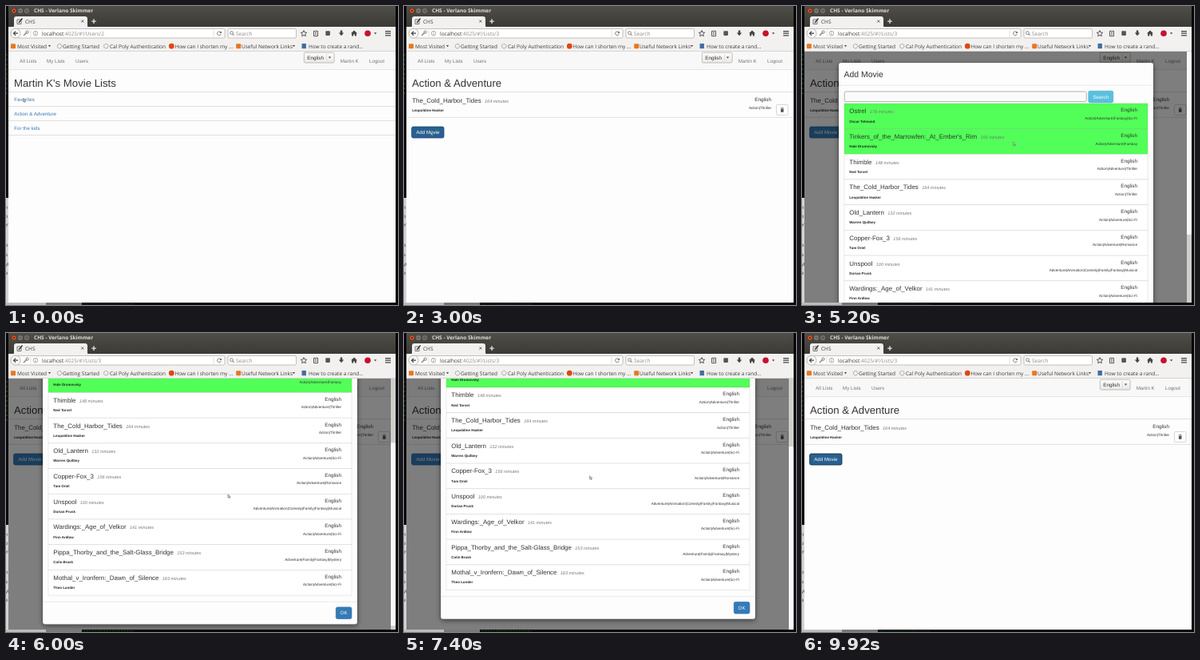
An HTML page that plays this animation: 491x374 px, repeating every 9.96 s.

```html
<!DOCTYPE html>
<html lang="en">
<head>
<meta charset="utf-8">
<title>Movie lists</title>
<style>
html, body { margin: 0; width: 100%; height: 100%; overflow: hidden; background: #000; }
svg { display: block; width: 491px; height: 374px; }
text { font-family: "Liberation Sans", Arial, sans-serif; white-space: pre; text-rendering: geometricPrecision; }
.ui { font-family: "Open Sans", "Noto Sans", sans-serif; }
.b { font-weight: bold; }
.i { font-style: italic; }
.end { text-anchor: end; }
.mid { text-anchor: middle; }
</style>
</head>
<body>
<svg id="stage" viewBox="0 0 491 374"></svg>
<script>
const LOOP = 9960;
const ROW = 31.7, LIST_TOP = 121.9, SCROLL = 117.3;

const movies = [
  ["Ostrel", 178, "Oscar Telmond", "Action|Adventure|Fantasy|Sci-Fi"],
  ["Tinkers_of_the_Marrowfen:_At_Ember's_Rim", 169, "Hale Drumovsky", "Action|Adventure|Fantasy"],
  ["Thimble", 148, "Ned Torvel", "Action|Adventure|Thriller"],
  ["The_Cold_Harbor_Tides", 164, "Leopoldine Hasker", "Action|Thriller"],
  ["Old_Lantern", 132, "Warren Quilbey", "Action|Adventure|Sci-Fi"],
  ["Copper-Fox_3", 156, "Tam Oriel", "Action|Adventure|Romance"],
  ["Unspool", 100, "Dorian Prusk", "Adventure|Animation|Comedy|Family|Fantasy|Musical"],
  ["Wardings:_Age_of_Velkor", 141, "Finn Ardlow", "Action|Adventure|Sci-Fi"],
  ["Pippa_Thorby_and_the_Salt-Glass_Bridge", 153, "Colin Brask", "Adventure|Family|Fantasy|Mystery"],
  ["Mothal_v_Ironfern:_Dawn_of_Silence", 183, "Theo Lunder", "Action|Adventure|Sci-Fi"]
];

// When a row gets picked: row index -> ms
const picks = { 0: 4400, 1: 4900, 5: 7500 };

// Pointer path: ms, x, y
const path = [
  [0, 21, 115], [300, 22, 115.5], [900, 43, 132], [1200, 43, 133], [1700, 42.5, 135.5],
  [1900, 38, 146], [2400, 33, 156], [3300, 33, 157], [4000, 315.5, 141.5], [4400, 315.5, 141.5],
  [4800, 264, 169.5], [5300, 264, 169.5], [6100, 278, 202.5], [6900, 278, 202.5],
  [7400, 232, 178], [7800, 232, 178], [8500, 211, 245], [8800, 211, 245],
  [9000, 265, 285], [9300, 422, 342], [9900, 422, 342]
];

const text = (x, y, s, size, fill, cls = "") =>
  `<text x="${x}" y="${y}" font-size="${size}" fill="${fill}" class="${cls}">${s.replace(/&/g, "&amp;")}</text>`;
const ui = (x, y, s, fill = "#3c3c3c", cls = "") => text(x, y, s, 6.5, fill, "ui " + cls);
const rect = (x, y, w, h, fill, extra = "") =>
  `<rect x="${x}" y="${y}" width="${w}" height="${h}" fill="${fill}" ${extra}/>`;
const dot = (x, y, r, fill, extra = "") => `<circle cx="${x}" cy="${y}" r="${r}" fill="${fill}" ${extra}/>`;
const line = (d, stroke = "#4a4a4a", w = 1) => `<path d="${d}" fill="none" stroke="${stroke}" stroke-width="${w}"/>`;
const shape = (d, fill = "#4a4a4a") => `<path d="${d}" fill="${fill}"/>`;
const caret = (x, y) => shape(`M${x - 1.6} ${y - 1}h3.2l-1.6 2.2z`);
const group = (id, body, extra = "") => `<g id="${id}" ${extra}>${body}</g>`;
const rule = y => rect(3, y, 485, 1, "#e0e0e0");

function desktop() {
  const scraps = [["n", 254], ["o", 265], ["Y", 276], ["p", 301], ["s", 313], ["yt", 325], ["e", 336]];
  let out = rect(0, 0, 491, 374, "#050505") + rect(0, 240, 3, 134, "#d4d4d4") +
    rect(0, 371, 50, 3, "#bdbdbd") + rect(50, 371, 45, 3, "#77787a");
  for (const [s, y] of scraps) out += text(-1, y, s, 6, "#444");
  return out + line("M97 372.5H160", "#164a16", '1" stroke-dasharray="2.4 1.2') +
    line("M1 60V110", "#164a16", '1.4" stroke-dasharray="2 4');
}

function titleBar() {
  return rect(3, 0, 485, 27, "url(#bar)") +
    dot(10, 6, 3.2, "#e2562b", 'stroke="#2b2a27" stroke-width=".6"') +
    line("M8.8 4.8l2.4 2.4m0-2.4l-2.4 2.4", "#3b1a0c", .8) +
    dot(18, 6, 3, "#7d7a72") + line("M16.6 6h2.8", "#35342f", .8) +
    dot(26, 6, 3, "#7d7a72") + line("M24.8 4.9h2.4v2.2h-2.4z", "#35342f", .6) +
    ui(35, 8.3, "CHS - Verlano Skimmer", "#e4e0d6", "b") +
    shape("M8 27q2 0 2-3v-8q0-3 3-3h86q3 0 3 3v8q0 3 2 3z", "#f2f1f0") +
    line("M14 17h5v5.5h-5z", "#6a6a6a", .9) + line("M16 21l4.5-5.5", "#333", 1.3) +
    ui(24, 21.6, "CHS") + line("M94.3 17.6l3 3m0-3l-3 3", "#555", .9) +
    line("M110 16.3v5.6M107.2 19.1h5.6", "#e8e6e0", 1.3);
}

function toolbar() {
  const field = (x, w) => rect(x, 28.5, w, 11.5, "#fff", 'rx="1.5" stroke="#b5b2ad" stroke-width=".8"');
  return rect(3, 26, 485, 31, "#f2f1f0") + field(14, 260) + field(278, 85.5) +
    dot(12, 34.2, 6, "#fafafa", 'stroke="#a9a6a1" stroke-width=".8"') +
    line("M15 34.2h-5.4m2.5-2.6l-2.6 2.6l2.6 2.6", "#444", 1.2) +
    line("M22 37l4-4", "#777", 1.1) + dot(26.6, 32.6, 1.6, "none", 'stroke="#777" stroke-width="1"') +
    line("M31 30v8.5", "#d0d0d0", .7) +
    dot(37, 34.2, 2.8, "none", 'stroke="#8a8a8a" stroke-width=".7"') + line("M37 33.6v2.3M37 32.2v.8", "#8a8a8a", .8) +
    `<text x="45" y="36.6" font-size="6.5" class="ui" fill="#8a8a8a"><tspan fill="#333">localhost</tspan>:4025/#!/<tspan id="route"></tspan></text>` +
    line("M260 30v8.5", "#d0d0d0", .7) + line("M269.2 33.2a2.4 2.4 0 1 0 .1 2", "#666", .9) + shape("M270 31.4v2.6h-2.6z", "#666") +
    dot(282.5, 33.6, 1.9, "none", 'stroke="#666" stroke-width=".8"') + line("M283.9 35l1.8 1.9", "#666", 1) +
    ui(288, 36.6, "Search", "#8a8a8a") +
    `<path d="M373 30.6l1.1 2.4l2.6.3l-1.9 1.8l.5 2.6l-2.3-1.3l-2.3 1.3l.5-2.6l-1.9-1.8l2.6-.3z" fill="none" stroke="#444" stroke-width=".9"/>` +
    line("M385.5 31.4h5v6.2h-5zM387 33.4h2M387 35.4h2", "#444", .9) +
    rect(400.3, 31.3, 5.6, 5.6, "#555", 'rx=".8"') +
    shape("M418.8 30.6h2.4v3h2l-3.2 3.6l-3.2-3.6h2z", "#444") +
    shape("M436 30.4l4 3.8h-1.1v3.4h-2v-2.2h-1.8v2.2h-2v-3.4h-1.1z", "#444") +
    dot(453, 34.2, 3.8, "#c8102e") + caret(462.6, 34.2) +
    line("M475 31.6h7M475 34.2h7M475 36.8h7", "#444", 1.2) +
    rect(6, 47.2, 6, 6, "#e87722", 'rx="1"') + ui(14, 52.6, "Most Visited") + caret(54.5, 50) +
    dot(67, 50.2, 2.7, "none", 'stroke="#777" stroke-dasharray="1.2 .8"') + ui(71, 52.6, "Getting Started") +
    dot(125.3, 50.2, 2.7, "none", 'stroke="#777" stroke-dasharray="1.2 .8"') + ui(130, 52.6, "Cal Poly Authentication") +
    dot(207.3, 50.2, 3.4, "#dd4814") + ui(211.5, 52.6, "How can I shorten my ...") +
    rect(288.2, 47.2, 6, 6, "#e87722", 'rx="1"') + ui(295, 52.6, "Useful Network Links") + caret(360.5, 50) +
    rect(370.5, 47, 5.4, 6.2, "#3f6f9f") + ui(379, 52.6, "How to create a rand...") +
    rect(3, 56.4, 485, .7, "#c9c6c1");
}

function navBar() {
  const item = (x, s) => text(x, 70.8, s, 6.2, "#777");
  return rect(3, 57, 485, 314, "#fefdfe") + rect(3, 57, 485, 22.5, "#f8f8f8") + rect(3, 79, 485, .8, "#e2e2e2") +
    item(17, "All Lists") + item(51, "My Lists") + item(87, "Users") + item(418.7, "Martin K") + item(455, "Logout") +
    rect(373.3, 58.2, 37.8, 12.8, "url(#select)", 'rx="1.5" stroke="#b3b0ab" stroke-width=".8"') +
    text(377.3, 66.8, "English", 6.3, "#333") + line("M401.5 60v9", "#d4d2cf", .6) + caret(405.5, 64.6);
}

// One movie: title, length, director on the left; language and genres right-aligned
function movie([title, mins, by, genres], left, right, y) {
  return `<text x="${left}" y="${y}" font-size="7.93" fill="#333">${title}` +
    `<tspan dx="4.4" font-size="5.5" class="i" fill="#777">${mins} minutes</tspan></text>` +
    text(left, y + 11.2, by, 4.45, "#222", "b") +
    text(right, y - 2, "English", 6.3, "#333", "end") + text(right, y + 7.5, genres, 4.62, "#333", "end");
}

function userPage() {
  return text(10, 101, "Martin K's Movie Lists", 13.2, "#333") + [107, 125, 143, 161].map(rule).join("") +
    text(10.3, 119, "Favorites", 6.2, "#337ab7") +
    group("hoverLink", text(10.3, 137, "Action & Adventure", 6.2, "currentColor")) +
    text(10.3, 155, "For the kids", 6.2, "#337ab7");
}

function listPage() {
  return text(10, 101, "Action & Adventure", 13.2, "#333") + rule(107) + rule(138.8) +
    movie(movies[3], 10.2, 460, 121) +
    rect(466.4, 123.4, 14.6, 13, "#fff", 'rx="1.5" stroke="#ccc" stroke-width=".8"') +
    line("M471.6 128h4.2M473 127.1h1.4", "#444", .7) + shape("M471.9 128.8h3.6v4h-3.6z", "#555") +
    rect(9.6, 151, 40.4, 14, "#337ab7", 'id="add" rx="2" stroke="#2e6da4" stroke-width=".8"') +
    text(29.8, 160.3, "Add Movie", 6.2, "#fff", "mid");
}

function dialog() {
  let rows = "";
  movies.forEach((m, i) => {
    const y = LIST_TOP + i * ROW;
    rows += rect(53, y, 380, ROW, "#fff", `id="row${i}" stroke="#000" stroke-opacity=".1" stroke-width=".8"`) + movie(m, 59.3, 420, y + 12.4);
  });
  return rect(46, 71, 394, 404, "#fefdfe", 'rx="3" stroke="#000" stroke-opacity=".2" stroke-width=".5" filter="url(#shadow)"') +
    text(52.6, 88.8, "Add Movie", 10.45, "#333") + rect(46, 98.8, 394, .8, "#e5e5e5") +
    rect(53.2, 107, 303, 12.6, "#fbfbfb", 'rx="1.8" stroke="#aaa" stroke-width=".9"') +
    rect(358.8, 106.3, 31, 14.6, "#5bc0de", 'rx="2" stroke="#46b8da" stroke-width=".7"') +
    text(374.3, 115.8, "Search", 6.2, "#fff", "mid") + rows +
    rect(46, 446.6, 394, .8, "#e5e5e5") +
    rect(413.3, 453.7, 19.6, 14.6, "#337ab7", 'id="ok" rx="2" stroke="#2e6da4" stroke-width=".7"') +
    text(423.1, 463.2, "OK", 6.2, "#fff", "mid");
}

const gradient = (id, a, b) => `<linearGradient id="${id}" x2="0" y2="1"><stop stop-color="${a}"/><stop offset="1" stop-color="${b}"/></linearGradient>`;

document.getElementById("stage").innerHTML =
  `<defs>${gradient("bar", "#504e48", "#3a3935")}${gradient("select", "#fdfdfd", "#e9e8e6")}
   <clipPath id="view"><rect x="3" y="57" width="485" height="314"/></clipPath>
   <filter id="shadow" x="-5%" y="-5%" width="110%" height="110%"><feDropShadow dx="0" dy="2" stdDeviation="3" flood-opacity=".5"/></filter></defs>` +
  desktop() + titleBar() + toolbar() +
  group("page", navBar() + group("user", userPage()) + group("list", listPage()) +
    rect(3, 57, 485, 314, "#000", 'id="shade"') + group("modal", dialog()) +
    group("scrollbar", rect(482, 57, 6, 314, "#cfcecc") + rect(482, 57, 6, 229, "#fafafa", 'id="thumb" rx="1.5"')),
    'clip-path="url(#view)"') +
  group("pointer", `<path d="M.6 .8v4l1-.8l.7 1.5l.8-.4l-.6-1.4h1.2z" fill="#eee" stroke="#555" stroke-width=".6"/>`);

const $ = id => document.getElementById(id);
const set = (id, name, value) => $(id).setAttribute(name, value);
const show = (id, on) => set(id, "visibility", on ? "visible" : "hidden");
const ramp = (t, a, b) => Math.min(1, Math.max(0, (t - a) / (b - a)));
const smooth = p => p * p * (3 - 2 * p);
const easeOut = p => 1 - (1 - p) ** 2;

function pointerAt(t) {
  const k = Math.max(1, path.findIndex(p => p[0] >= t));
  const [a, x0, y0] = path[k - 1], [b, x1, y1] = path[k];
  const p = smooth(ramp(t, a, b));
  return [x0 + (x1 - x0) * p, y0 + (y1 - y0) * p];
}

function draw(t) {
  const onList = t >= 1300;
  show("user", !onList);
  show("list", onList);
  $("route").textContent = onList ? "Lists/3" : "Users/2";

  const hover = t >= 700;
  set("hoverLink", "color", hover ? "#23527c" : "#337ab7");
  set("hoverLink", "text-decoration", hover ? "underline" : "none");

  const dark = (t >= 2000 && t < 3400) || t >= 9500;
  set("add", "fill", dark ? "#286090" : "#337ab7");
  set("add", "stroke", t >= 9500 ? "#122b40" : dark ? "#204d74" : "#2e6da4");

  const open = easeOut(ramp(t, 3200, 3600)) * (1 - easeOut(ramp(t, 9400, 9700)));
  const scroll = SCROLL * smooth(ramp(t, 5400, 6100));
  set("shade", "opacity", .5 * ramp(t, 3200, 3400) * (1 - ramp(t, 9600, 9800)));
  set("modal", "opacity", open);
  set("modal", "transform", `translate(0 ${-scroll - 100 * (1 - open)})`);
  show("scrollbar", t > 3200 && t < 9700);
  set("thumb", "y", 57 + 85 * scroll / SCROLL);
  set("ok", "fill", t >= 9300 ? "#286090" : "#337ab7");
  for (const i in picks) set("row" + i, "fill", t >= picks[i] ? "#52ff58" : "#fff");

  set("pointer", "transform", `translate(${pointerAt(t)})`);
  show("pointer", t < 9800);
}

// Ten pictures a second, on a 40 ms grid
let last = -1;
function tick() {
  const t = performance.now() % LOOP;
  const step = Math.floor(Math.floor(t / 40) / 2.5);
  if (step !== last) draw((last = step) * 100);
  requestAnimationFrame(tick);
}
tick();
</script>
</body>
</html>
```
